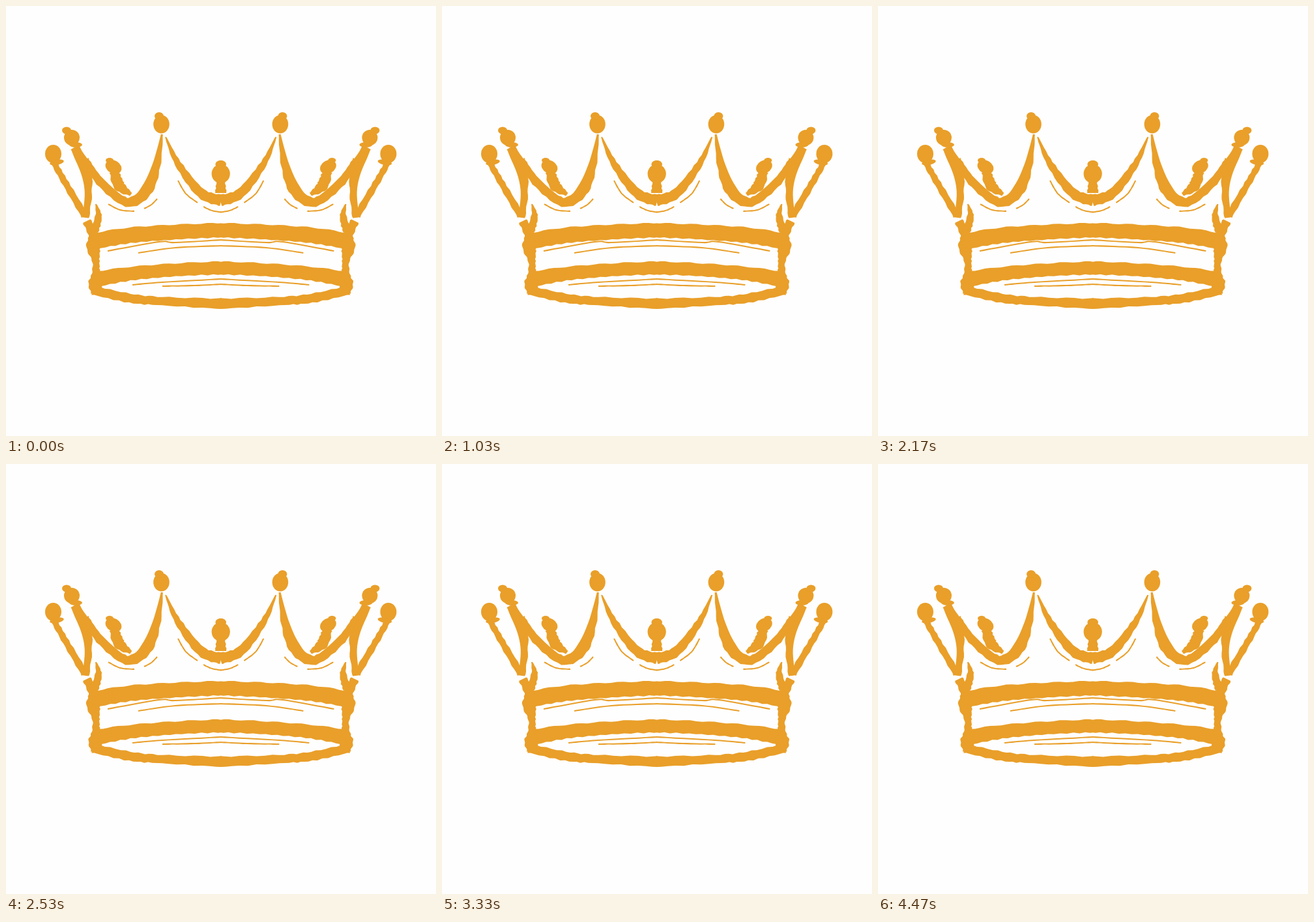
Write an HTML page with a canvas that moves like this. It is 660x660 px and loops after 4510 ms.

```html
<!DOCTYPE html>
<html lang="en">
<head>
<meta charset="utf-8">
<title>Crown</title>
<style>
  html, body { margin: 0; width: 100%; height: 100%; overflow: hidden; background: #fefefe; }
  canvas { display: block; width: 100vw; height: 100vh; }
</style>
</head>
<body>
<canvas id="crown" width="660" height="660"></canvas>
<script>
  const crown = document.getElementById('crown');
  const ctx = crown.getContext('2d');
  ctx.fillStyle = '#e99f29';

  const spline = (a, b, c, d, u) =>
    b + u / 2 * (c - a + u * (2 * a - 5 * b + 4 * c - d + u * (3 * (b - c) + d - a)));

  // Filled curve through [x, y, width] points with slightly uneven edges.
  function ribbon(...pts) {
    const at = i => pts[Math.max(0, Math.min(pts.length - 1, i))];
    const line = [];
    for (let i = 0; i < pts.length - 1; i++) {
      for (let k = 0; k < 8; k++) {
        line.push([0, 1, 2].map(c =>
          spline(at(i - 1)[c] ?? 2, at(i)[c] ?? 2, at(i + 1)[c] ?? 2, at(i + 2)[c] ?? 2, k / 8)));
      }
    }
    const [ex, ey, ew = 2] = pts.at(-1);
    line.push([ex, ey, ew]);
    const left = [], right = [];
    line.forEach(([x, y, w], i) => {
      const p = line[Math.max(0, i - 1)], q = line[Math.min(line.length - 1, i + 1)];
      const dx = q[0] - p[0], dy = q[1] - p[1], len = Math.hypot(dx, dy) || 1;
      const rough = Math.min(0.8, w / 16);
      const l = w / 2 + rough * Math.sin(i * 1.3 + x * 0.2);
      const r = w / 2 + rough * Math.sin(i * 1.7 + y * 0.3);
      left.push([x - dy / len * l, y + dx / len * l]);
      right.unshift([x + dy / len * r, y - dx / len * r]);
    });
    ctx.beginPath();
    left.concat(right).forEach(([x, y]) => ctx.lineTo(x, y));
    ctx.fill();
  }

  function blob(x, y, rx, ry, turn = 0) {
    ctx.beginPath();
    ctx.ellipse(x, y, rx, ry, turn, 0, 2 * Math.PI);
    ctx.fill();
  }

  function prong() {
    blob(72.5, 227, 12.5, 14);
    blob(78, 240, 11, 4, -0.2);
    ribbon([73, 240, 9], [92, 273, 10], [121, 322, 11]);
    ribbon([122, 325, 11], [126, 285, 12], [121, 247, 17], [105, 217, 14]);
    blob(101, 202, 12, 12);
    blob(93, 191, 7, 5.5);
    blob(107, 213, 10, 4);
  }

  function swags() {
    ribbon([122, 236, 10], [144, 269, 13], [185, 301, 14], [215, 284, 18], [231, 245, 12], [239.5, 197, 3]);
    ribbon([245, 201, 2], [264, 242, 10], [299, 287, 15], [330.5, 298.5, 17]);
    ribbon([264, 268], [276, 288], [294, 302]);
    ribbon([303, 308], [316, 314], [330.5, 316.5]);
    ribbon([157, 304], [175, 313], [197, 315]);
    ribbon([212, 311], [223, 305], [232, 296]);
  }

  function ornaments() {
    blob(165, 247, 13, 10, 0.5);
    blob(159, 237, 6, 4);
    ribbon([166, 254, 14], [174, 276, 17], [192, 289, 5]);
    blob(238.5, 181.5, 12.3, 14);
    blob(235, 169, 7, 6);
    blob(330, 257.5, 13.8, 14.5);
    blob(330, 243, 8, 6);
    ribbon([330, 266, 11], [330, 287, 17]);
  }

  function bands() {
    ribbon([135, 361, 25], [190, 352, 24], [260, 347, 23], [330.5, 344, 22]);
    ribbon([135, 420, 24], [190, 411, 21], [260, 405, 20], [330.5, 402, 20]);
    ribbon([133, 436, 14], [190, 448.5, 14], [240, 453, 13], [330.5, 457, 16]);
    ribbon([124, 330, 13], [134, 352, 15], [134, 370, 21], [138, 392, 11], [138, 412, 13], [137, 426, 21], [138, 441, 14]);
    ribbon([138, 304, 2], [142, 323, 10], [135, 346, 14]);
    ribbon([156, 376], [235, 362], [260, 363], [330.5, 359]);
    ribbon([203, 379], [260, 371], [330.5, 368]);
    ribbon([194, 428], [240, 424], [330.5, 419]);
    ribbon([240, 430], [290, 429], [330.5, 427]);
  }

  for (const side of [1, -1]) {
    ctx.setTransform(side, 0, 0, 1, side < 0 ? 659.4 : 0, 0);
    prong();
    swags();
    ornaments();
    bands();
  }

  const LOOP = 4510, TICK = 100 / 3, LAST_TICK = 134;
  const PULSE = 25, FADE = 6.5;            // in ticks
  const STARTS = [-12, 22, 57, 92, 127];   // ticks at which a pulse begins

  function opacityAt(ms) {
    const tick = Math.min(LAST_TICK, Math.floor(ms / TICK + 0.15));
    const step = tick - STARTS.findLast(s => s <= tick);
    const edge = Math.max(0, Math.min(step, PULSE - step));
    const p = Math.min(1, edge / FADE);
    return 1 - (1 - p) ** 2;
  }

  function draw() {
    crown.style.opacity = opacityAt(performance.now() % LOOP);
    requestAnimationFrame(draw);
  }
  draw();
</script>
</body>
</html>
```
